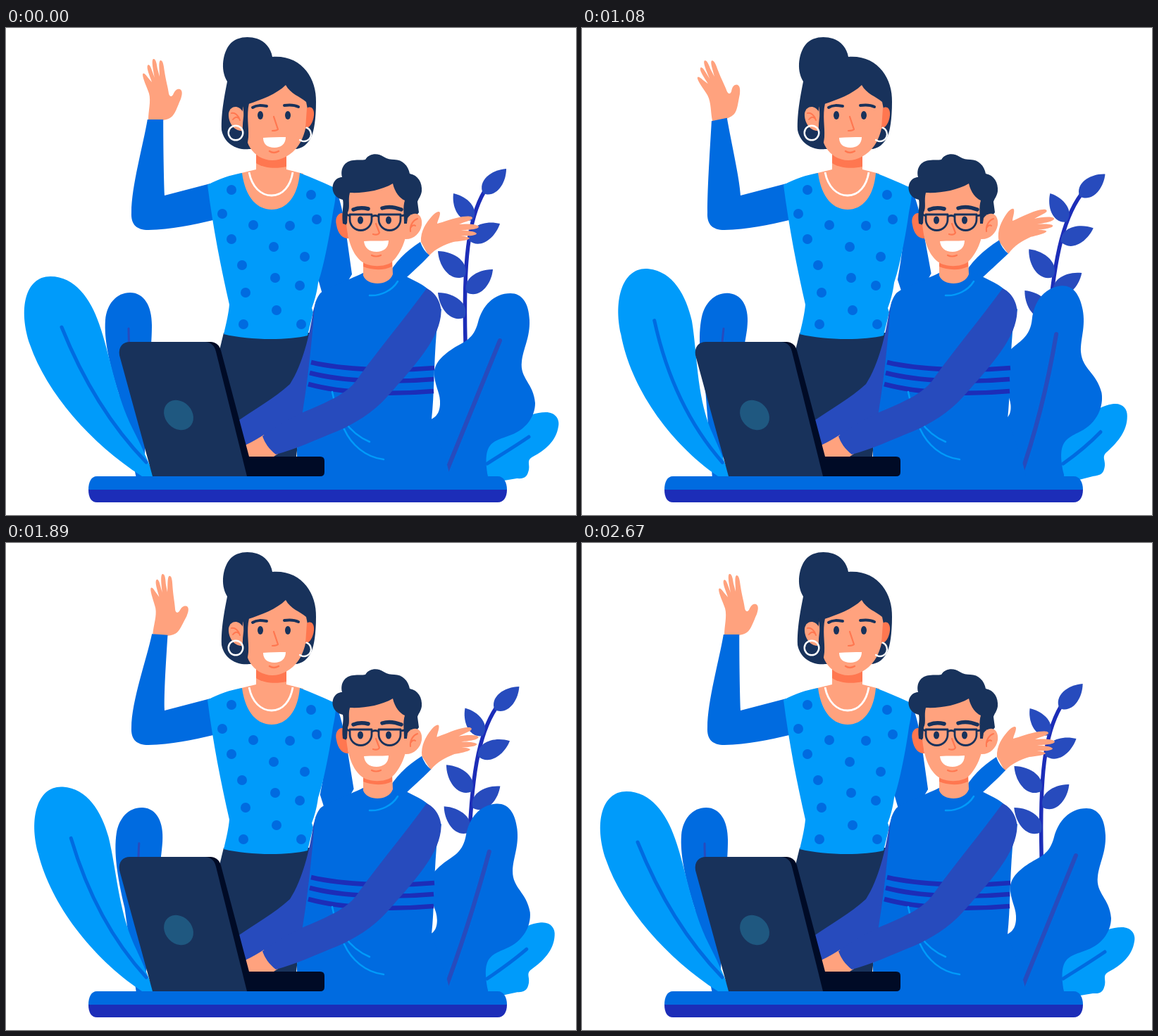
Animation, 809 px wide and 692 px high, one loop 2.7 s. Source, as an HTML page with a canvas:

```html
<!DOCTYPE html>
<html lang="en">
<head>
<meta charset="utf-8">
<title>Waving friends</title>
<style>
  html, body { margin: 0; width: 100%; height: 100%; overflow: hidden; background: #fff; }
  canvas { display: block; }
</style>
</head>
<body>
<canvas id="stage" width="809" height="692"></canvas>
<script>
const ctx = document.getElementById('stage').getContext('2d');
const LOOP = 2700, PEAK = 1160;
const NAVY = '#18325b', BLACK = '#000b26', BLUE = '#006be0', SKY = '#009bfa',
  INDIGO = '#274bbd', DEEP = '#1c2db8', SKIN = '#ffa27e', CORAL = '#ff7750', WHITE = '#fff';

const toPath = d => d instanceof Path2D ? d : new Path2D(d);

function fill(color, d) {
  ctx.fillStyle = color;
  ctx.fill(toPath(d));
}

function line(color, width, d, cap = 'round') {
  ctx.strokeStyle = color;
  ctx.lineWidth = width;
  ctx.lineCap = cap;
  ctx.lineJoin = 'round';
  ctx.stroke(toPath(d));
}

function oval(color, x, y, rx, ry = rx, turn = 0) {
  ctx.fillStyle = color;
  ctx.beginPath();
  ctx.ellipse(x, y, rx, ry, turn, 0, Math.PI * 2);
  ctx.fill();
}

function ring(x, y, r, from = 0, to = Math.PI * 2) {
  ctx.strokeStyle = WHITE;
  ctx.lineWidth = 2.4;
  ctx.beginPath();
  ctx.arc(x, y, r, from, to);
  ctx.stroke();
}

// k = 1 is linear, larger values ease in and out more strongly
const ease = (u, k) => u ** k / (u ** k + (1 - u) ** k);

const swing = (t, k) => t < PEAK
  ? ease(t / PEAK, k)
  : 1 - ease((t - PEAK) / (LOOP - PEAK), k);

function waveAt(t) {
  const keys = [[0, 0], [PEAK, 1.02], [2080, -0.5], [LOOP, 0]];
  const i = keys.findIndex(key => key[0] > t);
  const [t0, v0] = keys[i - 1], [t1, v1] = keys[i];
  return v0 + (v1 - v0) * ease((t - t0) / (t1 - t0), 1.75);
}

// Rotates the points of a path about a pivot, less so within `reach` of it
function bend(d, [px, py], angle, reach = 1) {
  return new Path2D(d.replace(/(-?[\d.]+) (-?[\d.]+)/g, (_, x, y) => {
    const dx = x - px, dy = y - py;
    const a = angle * Math.min(1, Math.hypot(dx, dy) / reach);
    const c = Math.cos(a), s = Math.sin(a);
    return `${(px + dx * c - dy * s).toFixed(2)} ${(py + dx * s + dy * c).toFixed(2)}`;
  }));
}

function posed(pivot, dx, dy, angle, draw) {
  ctx.save();
  ctx.translate(pivot[0] + dx, pivot[1] + dy);
  ctx.rotate(angle);
  ctx.translate(-pivot[0], -pivot[1]);
  draw();
  ctx.restore();
}

function leafPath(tx, ty, bx, by) {
  const dx = bx - tx, dy = by - ty;
  const at = (u, v) => `${(tx + dx * u - dy * v).toFixed(2)} ${(ty + dy * u + dx * v).toFixed(2)}`;
  return `M${tx} ${ty}C${at(.32, .3)} ${at(.85, .38)} ${at(1, 0)}C${at(.85, -.38)} ${at(.32, -.3)} ${at(0, 0)}Z`;
}

function branch(t) {
  posed([650, 528], 0, 0, .1075 * swing(t, 1), () => {
    line(DEEP, 5.5, 'M679 232C656 271 649 332 652 445L652 500');
    [[710, 200, 677, 235], [635, 235, 662, 273], [701, 278, 657, 302],
     [613, 317, 651, 353], [691, 343, 654, 376], [613, 376, 651, 411]]
      .forEach(leaf => fill(INDIGO, leafPath(...leaf)));
  });
}

function leaves(t) {
  const soft = swing(t, 1.75), strong = swing(t, 2.5);
  const plant = (color, shape, veinColor, width, vein, pivot, angle, reach) => {
    fill(color, bend(shape, pivot, angle, reach));
    line(veinColor, width, bend(vein, pivot, angle, reach));
  };
  plant(BLUE, 'M160 520C146 475 139 442 141 415C143 392 157 376 176 376C196 376 207 395 207 422C207 438 206 452 204 480L195 640L185 640Z',
    INDIGO, 3, 'M174 427C174 440 175 460 176 480', [185, 640], .128 * soft, 120);
  plant(SKY, 'M193 637C120 590 58 519 34 450C17 400 27 353 63 353C98 353 120 385 132 420C148 465 155 520 180 570C190 590 200 610 210 637Z',
    BLUE, 5, 'M79 425C105 490 142 558 199 617', [178, 640], .108 * strong, 215);
  plant(SKY, 'M683 645C678 620 676 600 684 588C698 572 714 566 726 559C740 551 752 546 766 546C780 546 786 556 784 566C781 587 765 600 748 609C738 614 744 620 742 628C740 636 738 641 725 640L695 645Z',
    BLUE, 5, 'M742 581C720 596 700 608 683 619', [683, 625], -.155 * soft, 90);
  plant(BLUE, 'M684 650L684 637C676 590 690 588 712 580C738 572 751 552 751 533C749 505 729 498 732 474C734 455 744 440 743 415C742 390 732 377 716 377C692 377 676 395 670 418C664 442 650 446 635 455C615 468 606 480 608 495C610 512 617 520 616 535C615 550 608 555 598 558L598 650Z',
    INDIGO, 6, 'M701 444C675 508 649 572 620 643', [623, 636], -.143 * soft, 190);
}

function wavingArm(t) {
  const s = waveAt(t), a = -.21 * s, wrist = [212, 130];
  const x = wrist[0] - 17 * s, dx = 11.2 * Math.cos(a), dy = 11.2 * Math.sin(a);
  const [lx, ly, rx, ry] = [x - dx, 130 - dy, x + dx, 130 + dy];
  posed(wrist, -17 * s, 0, a, () => fill(SKIN,
    'M202 130C202 118 206 104 203 93C200 84 194 72 194 66C195 62 199 67 201 70L207 77C204 68 199 57 201 53C203 50 206 56 207 60L211 71C209 60 206 46 209 44C213 43 214 52 215 58L218 69C218 60 216 48 219 46C223 45 224 55 225 62C227 75 230 85 231 93C232 98 235 98 237 95C240 88 243 86 247 87C251 89 250 95 248 101C243 112 240 123 234 127C225 133 210 132 202 130Z'));
  fill(BLUE, `M290 221L225 238C224 215 ${rx + 6 * s} ${ry + 35} ${rx} ${ry}L${lx} ${ly}C${lx - 6 + 4 * s} ${ly + 36} 178 225 178 262C177 280 186 287 202 287C235 286 265 280 294 273Z`);
}

function womanBody(t) {
  fill(NAVY, 'M309 433L432 433L412 609L330 609L300 470Z');
  wavingArm(t);
  fill(BLUE, bend('M464 225C474 235 480 270 484 300L491 350L470 385L449 378L443 357C452 320 460 260 464 225Z',
    [466, 240], -.045 * swing(t, 1)));
  fill(SKIN, 'M330 207L355 201L355 170L398 170L398 201L422 207L412 262L340 262Z');
  fill(CORAL, 'M355 176L398 176L398 197C385 200 367 200 355 192Z');
  fill(SKY, 'M286 223C303 214 318 209 335 206C340 243 358 258 377 258C398 258 414 240 417 206C433 212 449 219 464 226C470 230 468 243 464 262C458 305 449 345 443 362C441 378 437 390 434 398L436 404L428 437C400 444 345 444 309 435C313 418 316 405 317 393C305 340 294 285 286 223Z');
  [[320, 230], [433, 237], [307, 264], [351, 280], [403, 281], [441, 272], [320, 300], [380, 311],
   [424, 325], [335, 337], [382, 355], [417, 366], [340, 376], [384, 401], [337, 421], [419, 421]]
    .forEach(([x, y]) => oval(BLUE, x, y, 7));
  line(WHITE, 2.8, 'M345 205C349 226 362 238 377 238C393 238 404 224 407 205', 'butt');
}

function womanHead() {
  fill(NAVY, 'M314 76C303 58 309 34 317 24C326 12 344 11 356 15C368 19 376 29 378 41C420 38 441 72 440 105C440 130 437 146 434 153C430 164 420 172 410 172L345 172C330 174 310 166 306 145C305 120 311 92 314 76Z');
  fill(SKIN, 'M336 112L344 108C362 102 384 94 397 81C404 94 417 97 426 105L428 115C428 140 422 157 415 167C405 181 391 188 378 188C364 188 353 180 347 171C340 160 335 140 336 112Z');
  fill(SKIN, 'M336 119C331 110 319 109 316 121C315 135 324 147 336 146Z');
  fill(CORAL, 'M427 114C433 110 438 115 437 124C436 134 431 142 425 143Z');
  fill(NAVY, 'M335 106L345 107C341 125 345 140 344 155C343 165 341 171 339 172C336 165 337 155 336 146C335 135 340 125 335 106Z');
  line(CORAL, 2, 'M320 121C325 120 330 124 332 131M322 130C325 126 328 126 330 128');
  ring(326, 149, 10.3);
  ring(423, 151, 10, -1.2, 2.2);
  oval(NAVY, 361, 124, 4, 6);
  oval(NAVY, 400, 124, 4, 6);
  line(NAVY, 4, 'M350 113C356 109 363 110 370 111M395 110C402 109 409 109 415 112');
  line(CORAL, 2.2, 'M380 126L386 144C384 146 381 146 378 146');
  fill(WHITE, 'M365 156C375 155 387 155 397 155C397 165 390 170 381 170C371 170 365 165 365 156Z');
  line(CORAL, 2.4, 'M374 175Q380 179 387 175');
}

function raisedArm(t) {
  const q = swing(t, 1.5), x = 4 * q, y = -2.5 * q;
  posed([597, 315], x, y, -.13 * q, () => fill(SKIN,
    'M589 304C588 288 597 276 604 268C610 261 616 259 616 263C616 268 612 275 612 278C620 276 635 270 648 268C655 267 662 267 662 270C662 273 652 275 643 279C652 278 668 278 671 282C671 286 658 287 646 287C655 288 666 289 668 292C668 295 655 296 646 295C651 296 657 297 658 299C655 302 642 303 635 304C622 308 610 313 600 324Z'));
  fill(BLUE, `M540 355C552 332 568 317 ${588 + x} ${304 + y}Q${592 + x} ${316 + y} ${601 + x} ${323 + y}C590 335 575 348 565 358Z`);
}

function boyBody() {
  fill(INDIGO, 'M440 388L436 402C431 436 421 478 403 506C380 527 355 540 328 559L341 593L370 578L424 548L448 400Z');
  fill(BLUE, 'M447 376C460 366 490 357 509 347L549 344C570 355 590 362 600 372L618 400L611 432C607 480 608 520 604 556C612 580 625 610 630 637L413 637L413 598L421 545C427 510 434 450 438 395C440 386 443 380 447 376Z');
  line(DEEP, 6.5, 'M433 475C480 486 550 488 608 483M431 490C480 503 550 504 607 499M429 506C480 520 550 521 607 516', 'butt');
  line(SKY, 2.5, 'M516 380C532 381 548 373 556 360M463 517C468 545 485 575 516 588M480 570C490 592 510 610 536 613');
  fill(SKIN, 'M507 325L548 325L549 350C543 367 513 367 507 352Z');
  fill(CORAL, 'M507 328L548 328L548 339C536 345 518 344 507 339Z');
}

function boyHead() {
  fill(CORAL, 'M484 265C473 259 466 268 469 280C471 292 477 299 486 299Z');
  fill(NAVY, 'M478 278C476 262 480 252 478 244C465 241 461 229 465 220C468 214 473 212 477 212C474 199 481 189 493 188C500 187 506 188 510 187C515 178 528 177 536 183C541 186 546 187 551 187C563 187 571 196 573 207C585 209 591 220 590 232C589 239 585 243 584 247L586 262L574 278L560 282L490 282Z');
  fill(SKIN, 'M570 270C578 259 592 263 590 280C588 292 578 301 566 300Z');
  fill(SKIN, 'M484 278L485 262C489 255 485 245 488 234C508 235 532 231 549 221C552 234 559 242 566 245C563 255 565 264 565 278L570 278C569 300 560 322 547 333C537 340 515 340 505 332C492 322 485 302 483 278Z');
  line(CORAL, 2, 'M584 271C578 273 573 280 574 289M581 281C579 279 576 281 575 283');
  line(CORAL, 2.2, 'M525 278L530 291C528 294 524 294 521 293');
  oval(NAVY, 503, 273, 4, 5.6);
  oval(NAVY, 543, 273, 4, 5.6);
  line(NAVY, 5.5, 'M493 258Q503 254 514 257M534 256Q546 252 561 258');
  line(NAVY, 2.8, 'M488 265H519V272A15.5 15.5 0 0 1 488 272ZM529 265H560V272A15.5 15.5 0 0 1 529 272ZM519 268Q524 265 529 268M488 267L481 264M560 267L571 265');
  fill(WHITE, 'M508 303C520 302 532 303 543 302C543 313 535 318 526 318C515 318 509 312 508 303Z');
  line(CORAL, 2.2, 'M519 323Q525 326 532 323');
}

function boyFrontArm() {
  fill(SKIN, 'M339 593C350 588 358 583 366 578L386 605L380 609L343 609Z');
  fill(INDIGO, 'M597 370C612 377 620 395 617 410C612 445 580 480 540 525C520 547 495 562 470 573C440 585 410 599 383 606C373 598 367 589 364 580C385 565 400 556 424 545C465 528 487 517 500 497C530 455 565 414 597 370Z');
}

function laptop() {
  fill(BLACK, 'M280 446L291 446C300 447 303 452 305 458L345 609L446 609Q452 609 452 615V631Q452 637 446 637H338L290 460Z');
  fill(NAVY, 'M161 465C159 453 166 446 176 446L283 446C292 447 296 452 298 460L342 637L208 637Z');
  oval('#1f5880', 245, 550, 19, 23, -.75);
}

function desk() {
  fill(BLUE, 'M117 656C117 645 121 637 129 637H698C706 637 711 645 711 656Z');
  fill(DEEP, 'M117 656H711C711 667 706 674 698 674H129C121 674 117 667 117 656Z');
}

function frame() {
  const t = performance.now() % LOOP;
  ctx.fillStyle = WHITE;
  ctx.fillRect(0, 0, 809, 692);
  branch(t);
  leaves(t);
  womanBody(t);
  womanHead();
  raisedArm(t);
  boyBody();
  boyHead();
  boyFrontArm();
  laptop();
  desk();
  requestAnimationFrame(frame);
}
frame();
</script>
</body>
</html>
```
